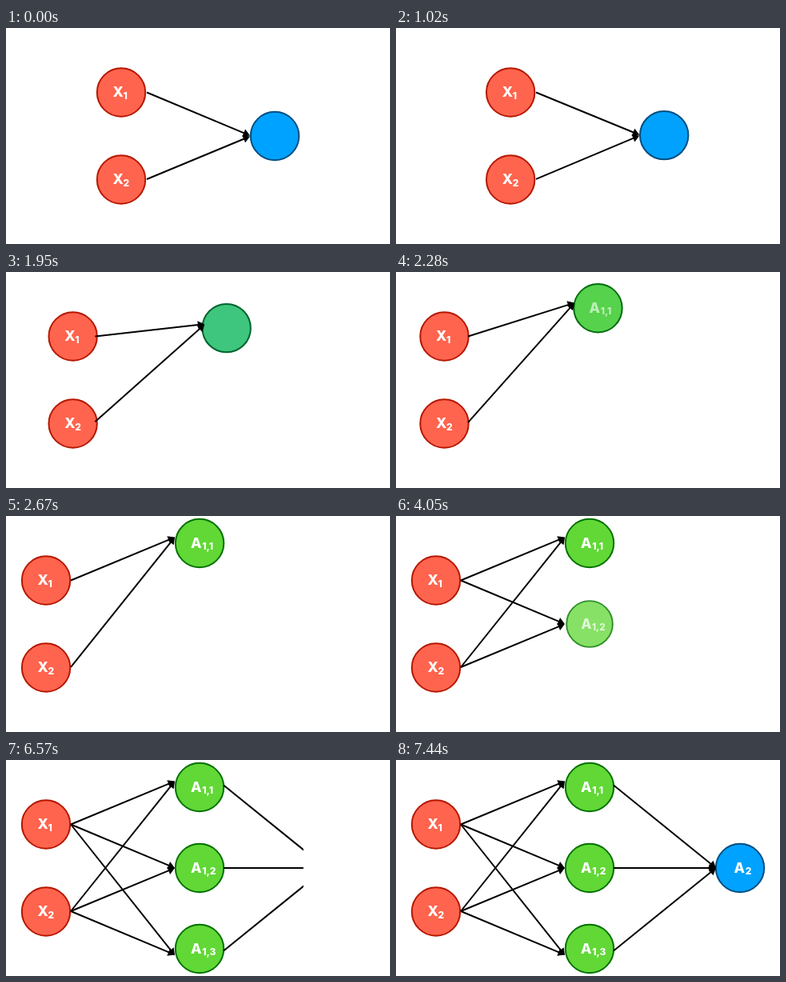
These frames come from a looping animation (480x270 px, 8.34 s). An HTML page with a canvas:

```html
<!DOCTYPE html>
<html>
<head>
<meta charset="utf-8">
<style>
  html, body { margin: 0; height: 100%; overflow: hidden; background: #fff; }
  canvas { display: block; width: 480px; height: 270px; }
</style>
</head>
<body>
<canvas></canvas>
<script>
const LOOP = 8340, END = 7440;
const RED = { fill: [255, 100, 78], line: [181, 23, 0] };
const GREEN = { fill: [97, 216, 54], line: [1, 113, 0] };
const BLUE = { fill: [0, 162, 255], line: [0, 77, 128] };

const canvas = document.querySelector('canvas');
const ratio = window.devicePixelRatio || 1;
canvas.width = 480 * ratio;
canvas.height = 270 * ratio;
const ctx = canvas.getContext('2d');
ctx.scale(ratio, ratio);

const clamp = v => Math.max(0, Math.min(1, v));
const mix = (a, b, p) => a + (b - a) * p;
const rgb = c => `rgb(${c.map(Math.round)})`;
const mixColor = (a, b, p) => a.map((v, i) => mix(v, b[i], p));

// cubic-bezier(.42, 0, .58, 1)
function easeInOut(u) {
  let lo = 0, hi = 1;
  for (let i = 0; i < 20; i++) {
    const s = (lo + hi) / 2, r = 1 - s;
    if (1.26 * s * r * r + 1.74 * s * s * r + s * s * s < u) lo = s; else hi = s;
  }
  return lo * lo * (3 - 2 * lo);
}

function label(letter, sub, x, y) {
  ctx.fillStyle = '#fff';
  ctx.font = '800 17.5px Inter, sans-serif';
  ctx.fillText(letter, x, y);
  ctx.font = '800 12px Inter, sans-serif';
  ctx.fillText(sub, x + (letter === 'X' ? 13 : 14.2), y + 2.3);
}

function node(x, y, color, letter, sub, { scale = 1, alpha = 1, textAlpha = 1 } = {}) {
  ctx.save();
  ctx.translate(x, y);
  ctx.scale(scale, scale);
  ctx.globalAlpha = alpha;
  ctx.beginPath();
  ctx.arc(0, 0, 30.2, 0, 2 * Math.PI);
  ctx.fillStyle = rgb(color.fill);
  ctx.fill();
  ctx.strokeStyle = rgb(color.line);
  ctx.lineWidth = 2;
  ctx.stroke();
  ctx.globalAlpha = alpha * textAlpha;
  const left = letter === 'X' ? -10.5 : sub.length > 1 ? -11 : -7.5;
  label(letter, sub, left, 5.8);
  ctx.restore();
}

function arrow(x1, y1, x2, y2) {
  const length = Math.hypot(x2 - x1, y2 - y1);
  ctx.save();
  ctx.translate(x1, y1);
  ctx.rotate(Math.atan2(y2 - y1, x2 - x1));
  ctx.fillStyle = '#000';
  ctx.fillRect(0, -1, length - 6, 2);
  ctx.beginPath();
  ctx.moveTo(length, 0);
  ctx.lineTo(length - 8.5, -5);
  ctx.lineTo(length - 8.5, 5);
  ctx.fill();
  ctx.restore();
}

// Reveals arrows from left to right.
function wipe(t, start, left, right, arrows) {
  const p = clamp((t - start) / 840);
  if (!p) return;
  ctx.save();
  ctx.beginPath();
  ctx.rect(left, 0, (right - left) * p, 270);
  ctx.clip();
  arrows.forEach(a => arrow(...a));
  ctx.restore();
}

// Fades a node in while its size springs to rest.
function pop(t, start, ...args) {
  const d = t - start;
  if (d <= 0) return;
  const scale = d < 590 ? 1 - 0.42 * Math.exp(-0.0052 * d) * Math.cos(0.01496 * d) : 1;
  node(...args, { scale, alpha: clamp(d / 570) });
}

function draw(time) {
  const t = Math.min(time, END);
  const p = easeInOut(clamp((t - 900) / 1800));
  ctx.fillStyle = '#fff';
  ctx.fillRect(0, 0, 480, 270);

  const inputX = mix(144, 50, p);
  node(inputX, 80.5, RED, 'X', '1');
  node(inputX, 189.5, RED, 'X', '2');
  const color = {
    fill: mixColor(BLUE.fill, GREEN.fill, p),
    line: mixColor(BLUE.line, GREEN.line, p)
  };
  node(mix(336, 242, p), mix(135, 34, p), color, 'A', '1,1',
    { textAlpha: clamp((p - 0.7) / 0.3) });
  pop(t, 3620, 242, 135, GREEN, 'A', '1,2');
  pop(t, 5232, 242, 236, GREEN, 'A', '1,3');
  pop(t, 6845, 430, 135, BLUE, 'A', '2');

  // The connectors grow slightly while they travel.
  const grow = 16 * p * (1 - p);
  const startX = mix(176, 81, p) - grow, tipX = mix(305, 211, p) + grow;
  arrow(startX, 80.5, tipX, mix(134.5, 26.5, p));
  arrow(startX, 189 - grow / 2, tipX, mix(135.5, 26.5, p));

  wipe(t, 2695, 80, 212, [[81, 80.5, 211, 135], [81, 189, 211, 135]]);
  wipe(t, 4307, 80, 212, [[81, 80.5, 211, 244], [81, 189, 211, 243.5]]);
  wipe(t, 5920, 271, 401, [[272, 31.5, 400, 135], [272, 135, 400, 135], [272, 238.5, 400, 135]]);
}

const origin = performance.now();
function tick() {
  draw((performance.now() - origin) % LOOP);
  requestAnimationFrame(tick);
}
tick();
</script>
</body>
</html>
```
